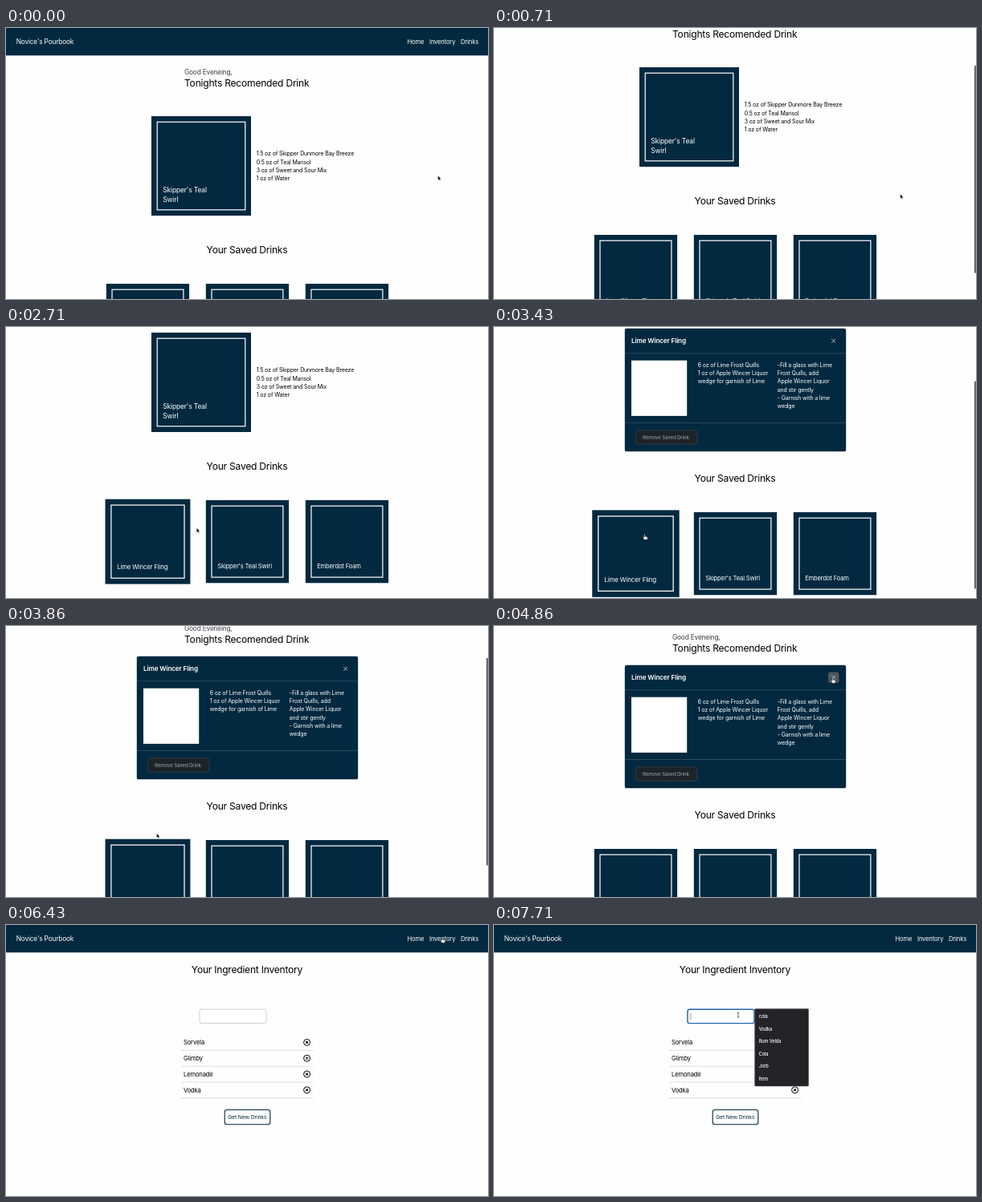
These frames come from a looping animation (600x338 px, 8000 ms). An HTML page:

```html
<!DOCTYPE html>
<html lang="en">
<head>
<meta charset="utf-8">
<title>Drink recipes</title>
<style>
  html, body { margin: 0; height: 100%; overflow: hidden; background: #fefefe; }
  svg { display: block; width: 100vw; height: 100vh; }
  text { font-family: Inter, "Open Sans", sans-serif; letter-spacing: -.02em; white-space: pre; }
</style>
</head>
<body>
<svg id="stage" viewBox="0 0 600 338"></svg>
<script>
const NAVY = '#02293f', STEP = 1000 / 7, STEPS = 56;

const text = (x, y, size, str, fill = '#000', extra = '') =>
  `<text x="${x}" y="${y}" font-size="${size}" fill="${fill}" ${extra}>${str}</text>`;
const lines = (x, y, gap, size, list, fill, extra) =>
  list.map((str, i) => text(x, y + i * gap, size, str, fill, extra)).join('');
const rect = (x, y, w, h, fill, extra = '') =>
  `<rect x="${x}" y="${y}" width="${w}" height="${h}" fill="${fill}" ${extra}/>`;
const path = (d, stroke, width = 1, extra = '') =>
  `<path d="${d}" fill="none" stroke="${stroke}" stroke-width="${width}" ${extra}/>`;
const group = (id, content) => `<g id="${id}">${content}</g>`;
const heading = (y, str) => text(300, y, 12.1, str, '#000', 'text-anchor="middle"');

const card = (x, y, size) => rect(x, y, size, size, NAVY) +
  rect(x + 7.2, y + 7.2, size - 14.4, size - 14.4, 'none', 'stroke="#fff" stroke-width="1.2"');
const savedCard = (x, name) => card(x, 319, 103.3) + text(x + 14.4, 404, 7.6, name, '#fff');

const nav = rect(0, 0, 600, 34.3, NAVY) +
  text(12.7, 20, 8.3, "Novice's Pourbook", '#fff') +
  text(499.5, 19.8, 7.6, 'Home', '#fff') +
  text(527, 19.8, 7.6, 'Inventory', '#fff') +
  text(566, 19.8, 7.6, 'Drinks', '#fff');

const home =
  text(222, 57.5, 8.3, 'Good Eveneing,', '#3c3f43') +
  text(222, 72.8, 12.1, 'Tonights Recomended Drink') +
  card(181, 110, 124) +
  lines(195.3, 205, 12, 8.5, ["Skipper's Teal", 'Swirl'], '#fff') +
  lines(311.8, 159.4, 10.35, 7, ['1.5 oz of Skipper Dunmore Bay Breeze',
    '0.5 oz of Teal Marisol', '3 oz of Sweet and Sour Mix', '1 oz of Water']) +
  heading(281.2, 'Your Saved Drinks') +
  group('hoverCard', savedCard(124.8, 'Lime Wincer Fling')) +
  savedCard(248.8, "Skipper's Teal Swirl") +
  savedCard(372.8, 'Emberdot Foam');

const modal = rect(162.8, 89.8, 275.4, 153.5, NAVY, 'rx="2.6"') +
  path('M163 120.8H438M163 207.5H438', '#fff', .5, 'opacity=".3"') +
  text(171, 108.2, 8.2, 'Lime Wincer Fling', '#fff', 'font-weight="600"') +
  group('closeHover', rect(416, 98.5, 13.4, 13.4, '#4d565c', 'rx="2.4"')) +
  path('M420.2 102.9l4.8 4.8m0-4.8l-4.8 4.8', '#d5dbdf', .8) +
  rect(171, 129.7, 69.2, 69.2, '#fff') +
  lines(253.8, 137.6, 10.37, 7,
    ['6 oz of Lime Frost Quills', '1 oz of Apple Wincer Liquor', 'wedge for garnish of Lime'], '#fff') +
  lines(352.8, 137.6, 10.37, 7, ['-Fill a glass with Lime', 'Frost Quills, add',
    'Apple Wincer Liquor', 'and stir gently', '- Garnish with a lime', 'wedge'], '#fff') +
  rect(176.6, 216.8, 76.3, 17.4, '#1c2429', 'rx="2.6" stroke="#3d464c" stroke-width=".7"') +
  text(185, 227.7, 6.1, 'Remove Saved Drink', '#8e9499', 'font-weight="500"');

const removeIcon = y => `<circle cx="374.6" cy="${y}" r="4" fill="none" stroke="#000"/>` +
  path(`M373.2 ${y - 1.4}l2.8 2.8m0-2.8l-2.8 2.8`, '#000', 1.1);
const inventory = heading(60.4, 'Your Ingredient Inventory') +
  ['Sorvela', 'Glimby', 'Lemonade', 'Vodka'].map((name, i) => {
    const y = 146.4 + i * 19.8;
    return text(221, y + 2.9, 7.6, name) + removeIcon(y) + path(`M217.5 ${y + 10}H383`, '#cfd2d5', .7);
  }).join('') +
  rect(241, 105.2, 83, 17.4, '#fff', 'rx="2.4" stroke="#b9bec3" stroke-width=".7"') +
  group('focus', rect(241, 105.2, 83, 17.4, 'none', 'rx="2.4" stroke="#2467b3" stroke-width="1.4"') +
    path('M245 110.2v7.8', '#333', .5)) +
  rect(272.2, 230.5, 56.6, 18.2, '#fff', `rx="2.8" stroke="${NAVY}" stroke-width="1.1"`) +
  text(276.2, 242.2, 6.8, 'Get New Drinks', NAVY) +
  group('suggestions', rect(324.6, 104.6, 67, 96.4, '#222427', 'rx="1" stroke="#55585b" stroke-width=".5"') +
    lines(329.8, 116.2, 15.55, 5.6, ['cola', 'Vodka', 'Rum Velda', 'Cola', 'Jorb', 'Item'],
      '#fff', 'font-weight="500"'));

const pointers =
  group('arrow', '<path d="M0 0V6l1.4-1.3 .9 2.1 1-.4-.9-2h1.9Z" fill="#000" stroke="#fff" stroke-width=".5"/>') +
  group('hand', '<path d="M-.7 .6Q0-.5 .7 .6V2.6L3.4 3.2Q4 3.5 3.8 4.8L3.2 7H-.4L-2.2 4.4Q-2-.0-.7 4Z"' +
    ' fill="#fff" stroke="#000" stroke-width=".6"/>') +
  group('beam', path('M-1.2-3.2Q0-3.2 0-2.4Q0-3.2 1.2-3.2M0-2.4V2.4M-1.2 3.2Q0 3.2 0 2.4Q0 3.2 1.2 3.2', '#222', .7));

const $ = id => document.getElementById(id);
$('stage').innerHTML =
  group('page', nav + group('home', home) + group('modal', modal) + group('inventory', inventory)) +
  rect(597.8, 0, 2.2, 259, '#6c6c6c', 'id="thumb" rx="1"') + group('cursor', pointers);

// Keys are [step, value]; steps run at seven per second.
const scrollKeys = [[3, 0], [4, 28], [5, 61], [6, 80], [7, 91], [8, 98], [9, 101.5], [11, 103],
  [23, 103], [24, 88], [25, 73], [26, 61], [27, 52], [28, 47], [31, 41],
  [36, 41], [37, 27], [38, 6], [39, -1.7], [41, 0]];
const xKeys = [[1, 537.6], [4, 505.6], [16, 505.6], [20, 187.5], [31, 187.5], [34, 421.5],
  [39, 421.5], [44, 543], [46, 543], [52, 304]];
const yKeys = [[1, 184], [4, 207], [16, 207], [20, 258.5], [31, 258.5], [34, 64.4],
  [39, 64.4], [44, 15.5], [46, 15.5], [52, 112]];
const hoverKeys = [[18, 1], [20, 1.05], [26, 1.05], [28, 1]];

function valueAt(keys, step) {
  const next = keys.findIndex(key => key[0] > step);
  if (next < 0) return keys[keys.length - 1][1];
  if (!next) return keys[0][1];
  const [s0, v0] = keys[next - 1], [s1, v1] = keys[next];
  const u = (step - s0) / (s1 - s0);
  return v0 + (v1 - v0) * u * u * (3 - 2 * u);
}

const within = (step, ...ranges) => ranges.some(([from, to]) => step >= from && step < to);
const show = (id, on) => { $(id).style.display = on ? '' : 'none'; };

function draw(now) {
  const step = Math.floor((now + 5) / STEP) % STEPS;
  const scroll = valueAt(scrollKeys, step), scale = valueAt(hoverKeys, step);
  $('page').setAttribute('transform', `translate(0 ${-scroll})`);
  $('thumb').setAttribute('y', Math.max(0, scroll * 338 / 441));
  $('hoverCard').setAttribute('transform',
    `translate(176.45 370.65) scale(${scale}) translate(-176.45 -370.65)`);
  $('cursor').setAttribute('transform', `translate(${valueAt(xKeys, step)} ${valueAt(yKeys, step)})`);

  const hand = within(step, [20, 27], [34, 35], [43, 47]), beam = step >= 52;
  show('hand', hand);
  show('beam', beam);
  show('arrow', !hand && !beam);
  show('thumb', within(step, [4, 11], [24, 34], [37, 44]));
  show('modal', within(step, [22, 35]));
  show('closeHover', step === 34);
  show('home', step < 45);
  show('inventory', step >= 45);
  show('focus', step >= 53);
  show('suggestions', step >= 54);
  requestAnimationFrame(() => draw(performance.now() - start));
}
const start = performance.now();
draw(0);
</script>
</body>
</html>
```
